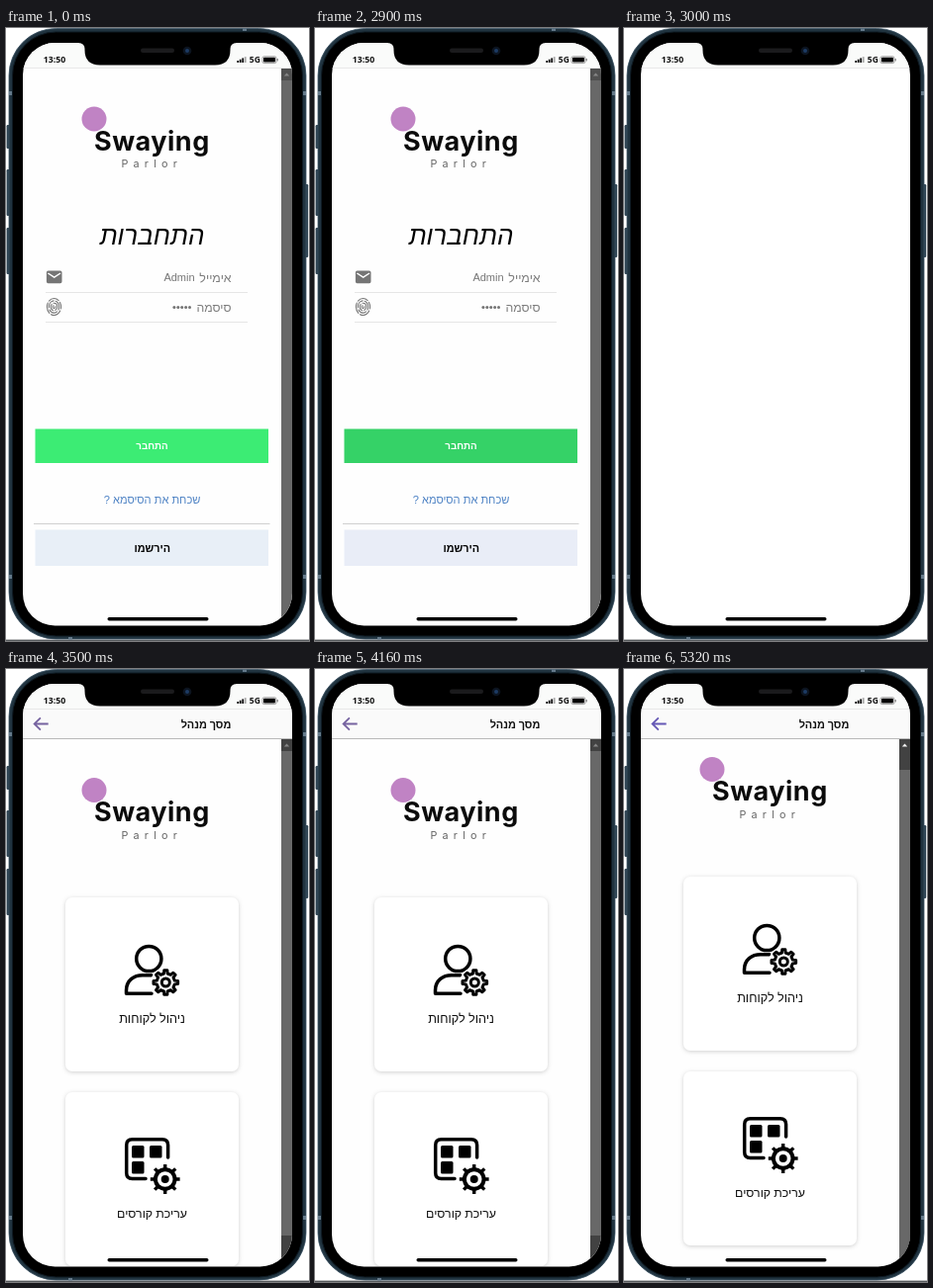
Recreate the animation shown at these times as an HTML page. Size 306 by 620 pixels, loop 5.8 s.

```html
<!DOCTYPE html>
<html lang="he">
<head>
<meta charset="utf-8">
<title>Login flow</title>
<style>
html, body { margin: 0; width: 100%; height: 100%; overflow: hidden; background: #fff; }
svg { display: block; width: 306px; height: 620px; }
text { font-family: "Liberation Sans", Arial, sans-serif; text-anchor: middle; }
.open { font-family: "Open Sans", "Noto Sans", sans-serif; }
.logo { font-family: Inter, Roboto, sans-serif; text-anchor: start; }
.he { direction: rtl; }
.b { font-weight: 700; }
.line { fill: none; stroke: #000; stroke-width: 3.5; stroke-linecap: round; stroke-linejoin: round; }
.card { fill: #fff; filter: drop-shadow(0 1px 2px rgba(0, 0, 0, .18)); }
</style>
</head>
<body>
<svg viewBox="0 0 306 620">
  <defs>
    <clipPath id="screenClip"><rect x="17" y="15" width="272" height="589.5" rx="32.5"/></clipPath>
    <clipPath id="pageClip"><rect x="17" y="71" width="261" height="534"/></clipPath>
    <g id="brand">
      <circle cx="89" cy="92" r="12.5" fill="#c083c4"/>
      <text class="logo b" x="89" y="123.5" font-size="27" letter-spacing=".5" fill="#0b0b0b">Swaying</text>
      <text class="logo" x="116.5" y="141" font-size="10.8" letter-spacing="5.2" fill="#666">Parlor</text>
    </g>
  </defs>

  <rect id="backdrop" width="306" height="620" fill="#fff"/>
  <rect y="618.6" width="306" height="1.4" fill="#55595c"/>

  <g fill="#2b404f">
    <rect x=".6" y="98" width="5" height="24" rx="1.2"/>
    <rect x=".6" y="143" width="5" height="47" rx="1.2"/>
    <rect x=".6" y="202" width="5" height="47" rx="1.2"/>
    <rect x="300.5" y="158" width="4.7" height="74" rx="1.2"/>
  </g>
  <rect x="3" y=".5" width="300" height="617.5" rx="47.5" fill="#20333f" stroke="#3d5566" stroke-width=".8"/>
  <rect x="6.5" y="4" width="293" height="611" rx="44" fill="#000" stroke="#0e1a23"/>
  <g fill="#64798a">
    <rect x="3" y="64" width="3" height="4"/><rect x="300" y="64" width="3" height="4"/>
    <rect x="3" y="553" width="3" height="4"/><rect x="300" y="553" width="3" height="4"/>
    <rect x="239" y=".5" width="4" height="2.5"/><rect x="63" y="616" width="4" height="2.5"/>
  </g>

  <g clip-path="url(#screenClip)">
    <rect id="paper" x="17" y="15" width="272" height="590" fill="#fff"/>

    <g id="login">
      <use href="#brand"/>
      <text class="he" x="147.5" y="219" font-size="26" font-style="italic">התחברות</text>

      <path d="M42.6 245.5h12.2q1.7 0 1.7 1.7v9.4q0 1.7-1.7 1.7H42.6q-1.7 0-1.7-1.7v-9.4q0-1.7 1.7-1.7z" fill="#757575"/>
      <path d="M42.4 248l6.3 4.2 6.3-4.2" fill="none" stroke="#fff" stroke-width="1.5"/>
      <text class="he" x="211.5" y="256.5" font-size="12.4" fill="#7c7c7c">אימייל</text>
      <text x="175" y="256" font-size="11" fill="#757575">Admin</text>
      <path d="M40 267.5H244M40 297.5H244" stroke="#e6e6e6"/>

      <g id="finger" fill="none" stroke="#757575" stroke-width="1.1" stroke-linecap="round"></g>
      <text class="he" x="210" y="287" font-size="12.3" fill="#7c7c7c">סיסמה</text>
      <g id="dots" fill="#757575"></g>

      <rect id="enter" x="29.5" y="405.5" width="235.5" height="34.5"/>
      <text class="he b" x="147.5" y="426" font-size="9.8" fill="#fff">התחבר</text>
      <text class="he" x="147.5" y="481" font-size="11.1" fill="#4d82c4">שכחת את הסיסמא ?</text>
      <path d="M28 501.5H266.5" stroke="#d0d0d0"/>
      <rect id="join" x="29.5" y="507.5" width="235.5" height="36.5"/>
      <text class="he b" x="147.8" y="529.5" font-size="10.8">הירשמו</text>

      <rect x="278" y="41" width="12" height="564" fill="#686868"/>
      <rect x="278" y="41" width="12" height="12" fill="#505050"/>
      <path d="M280.8 48.5h5.4l-2.7-3z" fill="#858585"/>
    </g>

    <g id="admin">
      <g clip-path="url(#pageClip)">
        <g id="page">
          <use href="#brand" y="30.5"/>
          <rect class="card" x="60" y="231" width="175" height="176" rx="7"/>
          <rect class="card" x="60" y="428" width="175" height="176" rx="7"/>

          <circle class="line" cx="144.3" cy="293" r="12.6"/>
          <path class="line" d="M147 328.3H121.5V325C121.5 315 129 309.700 138 309.700H147"/>
          <g id="gearA"></g>
          <text class="he open" x="147.500" y="357.500" font-size="12.600" fill="#111">ניהול לקוחות</text>

          <path class="line" d="M141 515.5H127.5Q121.700 515.500 121.700 509.700V481.500Q121.700 475.700 127.500 475.700H157.800Q163.600 475.700 163.600 481.500V494"/>
          <g>
            <rect x="127" y="482" width="12.500" height="12.500" rx="1.500"/>
            <rect x="145" y="482" width="12.500" height="12.500" rx="1.500"/>
            <rect x="127" y="498" width="12.500" height="12.500" rx="1.500"/>
          </g>
          <g id="gearB"></g>
          <text class="he open" x="147.500" y="554.500" font-size="12.300" fill="#111">עריכת קורסים</text>
        </g>
      </g>
      <rect x="278" y="71" width="12" height="534" fill="#424242"/>
      <rect id="thumb" x="278" y="83" width="12" height="490" fill="#686868"/>
      <path id="up" d="M280.8 78.5h5.4l-2.7-3z"/>
      <rect x="17" y="41" width="272" height="29.5" fill="#fafafa"/>
      <path d="M17 70.5H289" stroke="#b9b9b9"/>
      <path id="back" d="M42.7 55.5H28.6M34.9 49.3L28.6 55.5L34.9 61.7" fill="none" stroke-width="1.8"/>
      <text class="he open b" x="202" y="59.5" font-size="10.9" fill="#111">מסך מנהל</text>
    </g>

    <rect id="dark" x="17" y="40" width="272" height="565" fill="#121212"/>

    <rect x="17" y="15" width="272" height="25.5" fill="#fafbfa"/>
    <path id="barLine" d="M17 40.5H289" stroke="#e8e8e8"/>
    <text class="open b" x="49" y="34.7" font-size="8.7" fill="#111">13:50</text>
    <text class="open b" x="251.3" y="35.2" font-size="8.5" fill="#111">5G</text>
    <g id="bars"></g>
    <rect x="259" y="28.8" width="14" height="6.8" rx="1.6" fill="#fff" stroke="#777" stroke-width=".7"/>
    <rect x="260" y="29.8" width="12" height="4.8" rx=".8" fill="#000"/>
    <rect x="273.6" y="31" width="1" height="2.4" rx=".4" fill="#666"/>
    <rect x="102.5" y="596" width="102" height="3.4" rx="1.7" fill="#000"/>
  </g>
  <rect id="rim" x="17" y="15" width="272" height="589.5" rx="32.5" fill="none" stroke="#4a4a4a" stroke-width=".7"/>

  <path d="M73 14H233V15Q226.5 15.5 226.5 21V22Q226.5 37.5 211 37.5H95Q79.5 37.5 79.5 22V21Q79.5 15.5 73 15z"/>
  <rect x="136" y="20.5" width="34" height="4.5" rx="2.2" fill="#1b1b1d"/>
  <circle cx="183" cy="23" r="4.3" fill="#0c1420"/>
  <circle cx="183" cy="23" r="2" fill="#1d3a63"/>
</svg>

<script>
const $ = id => document.getElementById(id);
const show = (id, on) => { $(id).style.display = on ? "" : "none"; };
const set = (id, attrs) => { for (const k in attrs) $(id).setAttribute(k, attrs[k]); };

// Toothed wheel outline centred at x, y
function gear(x, y, outer, inner, teeth, top, foot) {
  const step = 2 * Math.PI / teeth, pts = [];
  for (let i = 0; i < teeth; i++) {
    const corners = [[inner, -foot], [outer, -top], [outer, top], [inner, foot]];
    for (const [r, off] of corners) {
      const a = (i + off) * step;
      pts.push((x + r * Math.sin(a)).toFixed(2) + " " + (y - r * Math.cos(a)).toFixed(2));
    }
  }
  return "M" + pts.join("L") + "z";
}

$("gearA").innerHTML =
  `<circle cx="161.3" cy="317" r="15" fill="#fff"/>
   <path class="line" style="stroke-width:3" d="${gear(161.3, 317, 12.4, 9.2, 8, .16, .26)}"/>
   <circle class="line" style="stroke-width:3" cx="161.3" cy="317" r="4"/>`;
$("gearB").innerHTML =
  `<circle cx="160.7" cy="516" r="16.5" fill="#fff"/>
   <path d="${gear(160.7, 516, 15, 11.3, 8, .14, .2)}"/>
   <circle cx="160.7" cy="516" r="11.8"/>
   <circle cx="160.7" cy="516" r="7.8" fill="#fff"/>
   <circle cx="160.7" cy="516" r="4"/>`;

// Fingerprint ridges: broken nested ovals
for (let i = 0; i < 4; i++) {
  const r = 1.2 + i * 1.95;
  $("finger").innerHTML += `<ellipse cx="48.5" cy="282" rx="${r}" ry="${r * 1.2}"
    stroke-dasharray="${5 + i * 2} 2.2" stroke-dashoffset="${i * 3}"/>`;
}

for (let i = 0; i < 5; i++)
  $("dots").innerHTML += `<circle cx="${169.9 + i * 3.9}" cy="282.5" r="1.5"/>`;
for (let i = 0; i < 4; i++) {
  const h = 2 + i * 1.3;
  $("bars").innerHTML += `<rect x="${233.3 + i * 2.5}" y="${35 - h}" width="1.8" height="${h}" fill="${i < 3 ? "#111" : "#aaa"}"/>`;
}

const LOOP = 5800;
const steps = [
  { at: 0, view: "login", enter: "#3cec74", join: "#e8eff7" },
  { at: 2900, view: "login", enter: "#35d267", join: "#e9edf7" },
  { at: 3000, view: "blank" },
  { at: 3100, view: "dark" },
  { at: 3500, view: "admin", scroll: 0, ink: "#7663a0" },
  { at: 4600, view: "admin", scroll: 21, ink: "#6558b5" }
];
let current;

function apply(s) {
  const dark = s.view === "dark";
  for (const id of ["login", "admin", "dark"]) show(id, s.view === id);
  show("rim", dark);
  show("barLine", !dark);
  set("backdrop", { fill: dark ? "#fffafa" : "#fff" });
  set("paper", { fill: s.view === "blank" ? "#fff" : "#fefefe" });
  if (s.view === "login") {
    set("enter", { fill: s.enter });
    set("join", { fill: s.join });
  }
  if (s.view === "admin") {
    set("page", { transform: `translate(0 ${-s.scroll})` });
    set("thumb", { y: s.scroll ? 102 : 83, height: s.scroll ? 503 : 490 });
    set("up", { fill: s.scroll ? "#f2f2f2" : "#858585" });
    set("back", { stroke: s.ink });
  }
}

function tick() {
  const t = performance.now() % LOOP;
  const next = steps.filter(s => s.at <= t).pop();
  if (next !== current) apply(current = next);
  requestAnimationFrame(tick);
}
tick();
</script>
</body>
</html>
```
